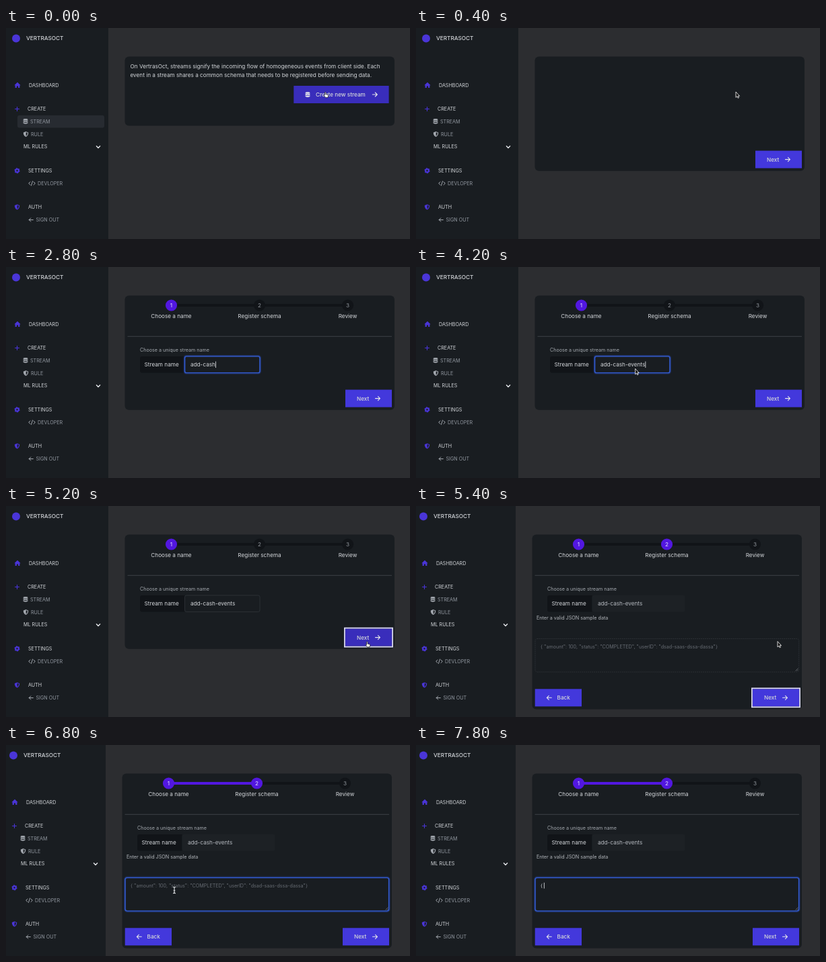
An HTML page for the animation above (8 s loop, 600 px wide and 314 px high).

```html
<!DOCTYPE html>
<html lang="en">
<head>
<meta charset="utf-8">
<title>Create a stream</title>
<style>
  html, body { margin: 0; width: 100%; height: 100%; overflow: hidden; background: #2c2d30; }
  svg { display: block; width: 100%; height: 100%; }
  text { font: 7.17px Inter, sans-serif; fill: #d3d6da; white-space: pre; }
  .body { font-size: 8.2px; }
  .strong { font-size: 8.2px; font-weight: 500; }
  .muted { fill: #9298a0; }
  .hint { fill: #666b72; }
  .mid { text-anchor: middle; }
  .panel { fill: #191d21; }
  .dark { fill: #111418; }
  .button { fill: #4338dc; }
  .hover { fill: #392dbb; }
  .accent { fill: #4a35d8; }
  .active { fill: #5217e0; }
  .line { fill: none; stroke: #e4e6ea; stroke-width: 1.1; stroke-linecap: round; stroke-linejoin: round; }
  .grey { fill: #a3a8af; }
  .field { fill: none; stroke: #2d3137; stroke-width: .9; }
  .glow { fill: none; stroke: #2c4fc0; stroke-width: 3; opacity: .42; }
  .focus { fill: none; stroke: #3560dc; stroke-width: 1.2; }
  .pointer { fill: #fff; stroke: #111; stroke-width: .7; stroke-linejoin: round; }
</style>
</head>
<body>
<svg viewBox="0 0 600 314" preserveAspectRatio="none">
  <defs>
    <path id="arrow" class="line" d="M0 0H7M4 -3L7 0L4 3"/>
    <path id="shield" d="M0 -4L3.7 -2.6Q3.8 2 0 4Q-3.8 2 -3.7 -2.6Z"/>
    <g id="database">
      <ellipse cy="-2.6" rx="3.4" ry="1.4"/>
      <path d="M-3.4 -1.6Q0 .4 3.4 -1.6V.2Q0 2 -3.4 .2ZM-3.4 1Q0 2.8 3.4 1V2.8Q0 4.8 -3.4 2.8Z"/>
    </g>
  </defs>

  <g id="page">
    <rect width="610" height="314" fill="#2c2d30"/>
    <rect class="panel" width="152" height="314"/>

    <circle class="accent" cx="15" cy="15.5" r="6"/>
    <text class="strong" x="30" y="18">VERTRASOCT</text>

    <path class="accent" d="M12.3 85.2L17 80.8L21.7 85.2H20.4V89H18.1V86.4H15.9V89H13.6V85.2Z"/>
    <text x="34" y="87.6">DASHBOARD</text>

    <path class="line" style="stroke:#4a35d8" d="M13.5 120.5H19.5M16.5 117.5V123.5"/>
    <text x="32" y="123.1">CREATE</text>
    <rect id="selected" x="17" y="130" width="129" height="18.5" rx="3" fill="#272b31"/>
    <use href="#database" class="grey" x="29" y="139"/>
    <text class="muted" x="36" y="141.8">STREAM</text>
    <use href="#shield" class="grey" x="29.5" y="158"/>
    <path class="panel" d="M29.7 155.2V160.8Q32 159.5 32 156Z"/>
    <text class="muted" x="37" y="160.7">RULE</text>
    <text x="26" y="179.4">ML RULES</text>
    <path class="line" style="stroke-width:1.4" d="M134.4 175.8L137 178.4L139.6 175.8"/>

    <circle cx="16.5" cy="212.3" r="2.3" fill="none" stroke="#4a35d8" stroke-width="2.2"/>
    <circle cx="16.5" cy="212.3" r="3.5" fill="none" stroke="#4a35d8" stroke-width="1.2" stroke-dasharray="1.83"/>
    <text x="33" y="214.8">SETTINGS</text>
    <path class="line" style="stroke:#a3a8af;stroke-width:1" d="M36 229L33.7 231.2L36 233.4M41 229L43.3 231.2L41 233.4M39.5 228L37.5 234.4"/>
    <text class="muted" x="47" y="233.8">DEVLOPER</text>

    <use href="#shield" class="accent" x="16.5" y="266.6"/>
    <path class="panel" d="M16.7 263.8V269.4Q19 268 19 264.6Z"/>
    <text x="33" y="269.2">AUTH</text>
    <path class="line" style="stroke:#a3a8af;stroke-width:1" d="M40.3 285.5H34.2M36.8 282.9L34.2 285.5L36.8 288.1"/>
    <text class="muted" x="44.5" y="288.1">SIGN OUT</text>

    <rect id="card" class="panel" x="176.5" y="42.5" width="400.5" rx="6"/>

    <g id="intro">
      <text class="body" x="184.5" y="60">On VertrasOct, streams signify the incoming flow of homogeneous events from client side. Each</text>
      <text class="body" x="184.5" y="72.6">event in a stream shares a common schema that needs to be registered before sending data.</text>
      <rect class="hover" x="427.3" y="86" width="141.3" height="26"/>
      <use href="#database" fill="#e4e6ea" x="448" y="99.2"/>
      <text class="strong" x="460" y="102">Create new stream</text>
      <use href="#arrow" x="544.3" y="99"/>
    </g>

    <g id="form">
      <rect class="dark" x="245.5" y="55" width="262" height="4"/>
      <rect id="progress" class="active" x="245.5" y="55" height="4"/>
      <g id="steps"></g>
      <rect x="180.5" y="102.8" width="392.5" height="1" fill="#3c4046"/>
      <text x="199" y="125.8" style="fill:#a6abb1">Choose a unique stream name</text>
      <path class="dark" d="M265.5 133H202Q199 133 199 136V154.5Q199 157.5 202 157.5H265.5Z"/>
      <text class="body" x="205.5" y="148.2">Stream name</text>
      <rect id="nameBox" class="field" x="265.5" y="133" width="111.5" height="24.5" rx="2.5"/>
      <rect id="nameLocked" x="265.5" y="133" width="138" height="24.5" rx="3" fill="#1d2125"/>
      <g id="nameFocus">
        <rect class="glow" x="265" y="132.5" width="112.5" height="25.5" rx="3"/>
        <rect class="focus" x="265.5" y="133" width="111.5" height="24.5" rx="2.5"/>
      </g>
      <text id="nameHint" class="body hint" x="274" y="148.2">Ex: add-cash-events</text>
      <text id="name" class="body" x="274" y="148.2"></text>
      <rect id="nameCaret" y="140.5" width=".8" height="9.5" fill="#e8eaee"/>
    </g>

    <g id="schema">
      <text x="183" y="169.4" style="fill:#b4b8bd">Enter a valid JSON sample data</text>
      <rect id="areaBox" class="field" x="181" y="197.5" width="391.7" height="49.5" rx="3" stroke-dasharray="2 1"/>
      <g id="areaFocus">
        <rect class="glow" x="180.6" y="197" width="392.5" height="50.5" rx="3.5"/>
        <rect class="focus" x="181" y="197.5" width="391.7" height="49.5" rx="3"/>
      </g>
      <path d="M567.5 245.5L571.5 241.5M569.7 245.5L571.5 243.7" stroke="#858a91" stroke-width=".6"/>
      <text id="areaHint" class="hint" x="189" y="212">{ "amount": 100, "status": "COMPLETED", "userID": "dsad-saas-dssa-dassa"}</text>
      <text id="area" x="189" y="212">{</text>
      <rect id="areaCaret" x="193.9" y="204.8" width=".8" height="8.8" fill="#e8eaee"/>
      <rect class="button" x="180.7" y="272.3" width="69.3" height="26"/>
      <use href="#arrow" transform="translate(205.3 285.3) scale(-1 1)"/>
      <text class="strong" x="213.5" y="288.3">Back</text>
    </g>

    <g id="next">
      <rect id="nextFill" x="504" y="182.6" width="69" height="26"/>
      <rect id="nextRing" x="502.9" y="181.6" width="71.2" height="28" fill="none" stroke="#d9d8f5" stroke-width="1.8"/>
      <text class="strong" x="521" y="198.6">Next</text>
      <use href="#arrow" x="548.5" y="195.6"/>
    </g>
  </g>

  <g id="cursor">
    <path id="arrowCursor" d="M0 -4V4.4L1.9 2.7L3.2 5.3L4.5 4.7L3.2 2.2H5.6Z" fill="#111" stroke="#fff" stroke-width=".8"/>
    <path id="handCursor" class="pointer" d="M-1.4 -3.2Q-.5 -4.2 .1 -3V-.4L3 .3Q4 .7 3.7 2L3 4.4H-.4L-2.9 1.3Q-2.6 .2 -1.4 1Z"/>
    <path id="beamCursor" fill="none" stroke="#e4e6e9" stroke-width="1.1" d="M-2 -4.7Q0 -4.7 0 -3.4Q0 -4.7 2 -4.7M0 -3.4V3.4M-2 4.7Q0 4.7 0 3.4Q0 4.7 2 4.7M-1.3 .8H1.3"/>
  </g>
</svg>

<script>
const LOOP = 8000, TICK = 200;
const STREAM = 'add-cash-events';
const el = id => document.getElementById(id);
const show = (id, on) => { el(id).style.display = on ? '' : 'none'; };
const ramp = (t, from, to) => Math.min(1, Math.max(0, (t - from) / (to - from)));
const ease = p => p * p * (3 - 2 * p);

// Each move: start, end, destination.
const startPoint = [475, 99];
const moves = [
  [500, 1100, [286.5, 146]],
  [4000, 4800, [537, 205.5]],
  [5400, 6100, [250, 216]]
];

el('steps').innerHTML = ['Choose a name', 'Register schema', 'Review'].map((label, i) => {
  const x = 245.5 + i * 131;
  return `<circle id="dot${i}" cx="${x}" cy="57" r="8.6"/>
    <text id="digit${i}" class="body mid" x="${x}" y="60">${i + 1}</text>
    <text class="body mid" x="${x}" y="76.4">${label}</text>`;
}).join('');

function cursorAt(t) {
  return moves.reduce((point, [from, to, target]) => {
    const p = ease(ramp(t, from, to));
    return point.map((v, i) => v + (target[i] - v) * p);
  }, startPoint);
}

function drawForm(t, second) {
  el('form').style.opacity = ramp(t, 400, 800);
  const progress = ease(ramp(t, 5300, 6000));
  el('progress').setAttribute('width', 131 * progress);
  for (let i = 0; i < 3; i++) {
    const active = i === 0 || (i === 1 && second);
    el('dot' + i).setAttribute('class', active ? 'active' : 'dark');
    el('digit' + i).style.fill = active ? '#e6e3fb' : '#90959b';
  }

  const focused = t >= 1600 && t < 5000;
  const count = Math.min(STREAM.length, Math.max(0, Math.floor((t - 2000) / 100)));
  const typing = t >= 2000 && t <= 3600;
  const name = el('name');
  name.textContent = STREAM.slice(0, count);
  name.style.fill = second ? '#b6bac0' : '';
  show('nameHint', count === 0);
  show('nameBox', !second);
  show('nameLocked', second);
  show('nameFocus', focused);
  show('nameCaret', focused && (typing || t % 1000 < 500));
  el('nameCaret').setAttribute('x', 274.2 + (count ? name.getComputedTextLength() : 0));
}

function drawCursor(t, hovering) {
  const beam = (t >= 1000 && t < 4200) || t >= 5800;
  const hand = t < 400 || hovering;
  const [x, y] = cursorAt(t);
  el('cursor').setAttribute('transform', `translate(${x} ${y})`);
  show('cursor', !(t >= 2000 && t < 4000) && t < 7400);
  show('handCursor', hand);
  show('beamCursor', beam && !hand);
  show('arrowCursor', !beam && !hand);
}

function draw(t) {
  const wizard = t >= 400, second = t >= 5400;
  const hovering = t >= 4800 && !second;

  el('page').setAttribute('transform', `translate(${second ? -4 : 0} 0)`);
  el('card').setAttribute('height', second ? 260 : wizard ? 170.3 : 103);
  show('selected', !wizard);
  show('intro', !wizard);
  show('form', wizard);
  show('schema', second);
  show('next', wizard);
  if (wizard) drawForm(t, second);

  el('next').setAttribute('transform', `translate(0 ${second ? 89.7 : 0})`);
  el('nextFill').setAttribute('class', hovering ? 'hover' : 'button');
  show('nextRing', t >= 5000 && t < 6600);

  show('areaBox', t < 6600);
  show('areaFocus', t >= 6600);
  show('areaHint', t < 7400);
  show('area', t >= 7400);
  show('areaCaret', t >= 7800);
  drawCursor(t, hovering);
}

const origin = performance.now();
function frame() {
  const t = (performance.now() - origin) % LOOP;
  draw(Math.floor(t / TICK) * TICK);
  requestAnimationFrame(frame);
}
frame();
</script>
</body>
</html>
```
